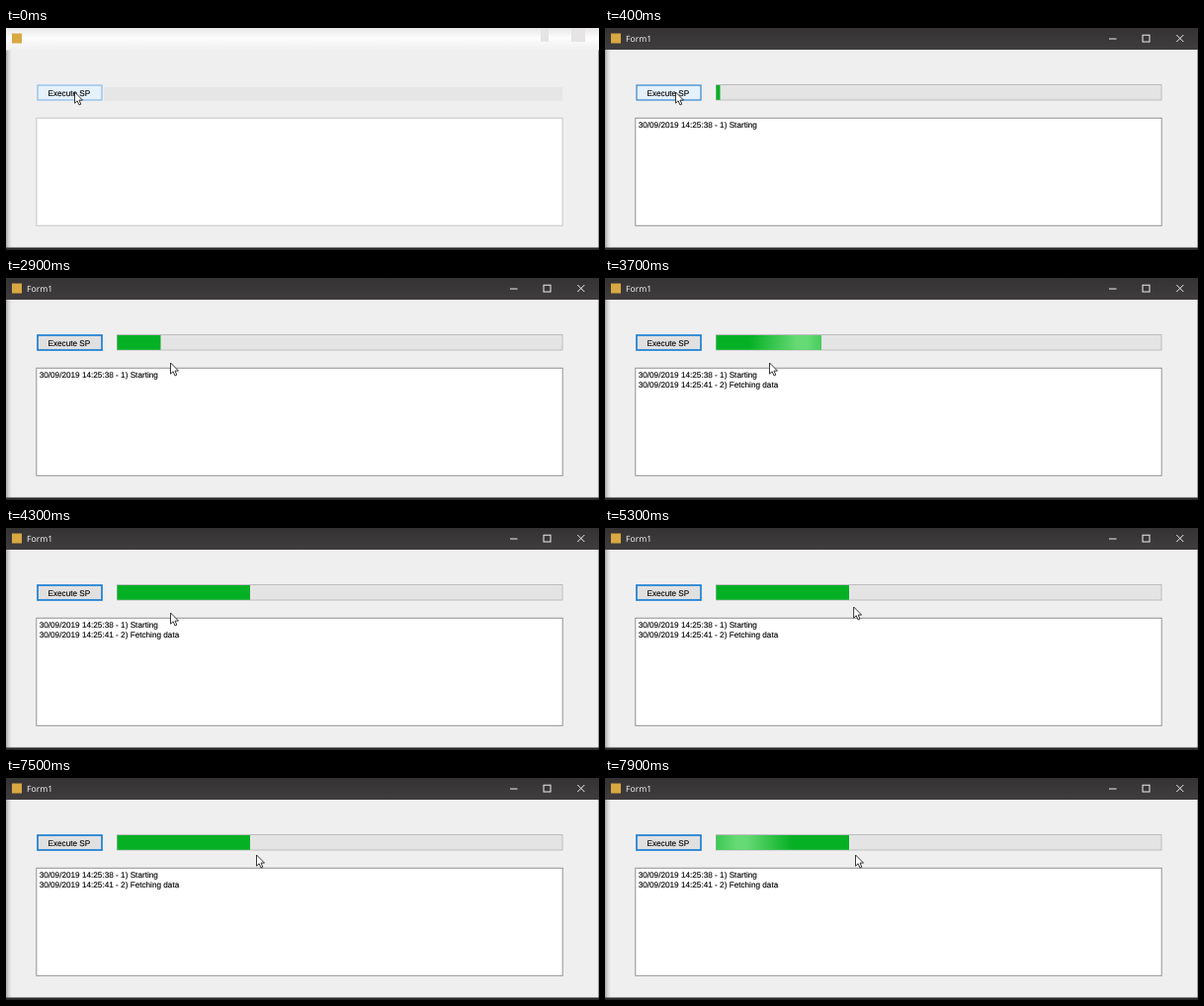
Animation of 600x225 px, one loop 8000 ms. Source, as an HTML page:

```html
<!DOCTYPE html>
<html lang="en">
<head>
<meta charset="utf-8">
<title>Form1</title>
<style>
  html, body { margin: 0; width: 100%; height: 100%; overflow: hidden; background: #f0eff0; }
  svg { display: block; width: 600px; height: 225px; }
  text {
    font: 8.2px "Liberation Sans", Arial, sans-serif;
    fill: #000; stroke: #000; stroke-width: .12px;
    text-rendering: geometricPrecision;
  }
  .title { font: 8.6px "Open Sans", sans-serif; fill: #fff; stroke: none; }
</style>
</head>
<body>
<svg viewBox="0 0 600 225">
  <defs>
    <linearGradient id="edge">
      <stop offset="0" stop-color="#aaa8a9"/>
      <stop offset=".5" stop-color="#dad9da"/>
      <stop offset="1" stop-color="#f0eff0"/>
    </linearGradient>
    <linearGradient id="bar" x2="0" y2="1">
      <stop offset="0" stop-color="#353233"/>
      <stop offset="1" stop-color="#403d3e"/>
    </linearGradient>
    <linearGradient id="paleBar" x2="0" y2="1">
      <stop offset="0" stop-color="#e9e7e8"/>
      <stop offset=".45" stop-color="#fdfdfd"/>
      <stop offset="1" stop-color="#f0eff0"/>
    </linearGradient>
    <linearGradient id="shine" gradientUnits="userSpaceOnUse" x1="-52" x2="52" y1="0" y2="0">
      <stop offset="0" stop-color="#7be387" stop-opacity="0"/>
      <stop offset=".46" stop-color="#7be387" stop-opacity=".82"/>
      <stop offset=".56" stop-color="#7be387" stop-opacity=".82"/>
      <stop offset="1" stop-color="#7be387" stop-opacity="0"/>
    </linearGradient>
  </defs>

  <rect width="600" height="225" fill="#f0eff0"/>
  <rect y="22" width="6" height="201" fill="url(#edge)"/>
  <rect x="599" y="22" width="1" height="201" fill="#a3a1a2"/>
  <rect width="600" height="22" fill="url(#bar)"/>
  <text class="title" x="21" y="14">Form1</text>
  <g fill="none" stroke="#f0f0f0">
    <path d="M510 11h7.5"/>
    <rect x="544" y="7.2" width="7" height="6.8"/>
    <path d="M578.3 7l7 7m0-7l-7 7"/>
  </g>

  <rect x="112.5" y="57.5" width="450.5" height="15.5" fill="#e5e4e5" stroke="#bdbcbd"/>
  <rect id="fill" x="112.5" y="58" height="14.8" fill="#06b025"/>
  <rect id="glow" x="112.5" y="58" height="14.8" fill="url(#shine)"/>

  <rect id="button" x="32" y="58" width="65" height="15"/>
  <rect x="30.8" y="91.3" width="532.4" height="109" fill="#fff" stroke="#939293"/>

  <g id="pale">
    <rect width="600" height="22.5" fill="url(#paleBar)"/>
    <path d="M541 0h8v14h-8zM572 0h14v14h-14z" fill="#e6e4e5"/>
    <rect x="99" y="54" width="468" height="22" fill="#f0eff0"/>
    <rect x="99" y="60" width="464" height="14" fill="#e7e6e7"/>
    <g fill="none" stroke="#fff" stroke-opacity=".5" stroke-width="1.6">
      <rect x="32" y="58" width="65" height="15"/>
      <rect x="30.8" y="91.3" width="532.4" height="109"/>
    </g>
  </g>

  <rect x="6" y="5.5" width="10" height="10" fill="#d8a842"/>
  <text x="42.5" y="69">Execute SP</text>
  <text id="line1" x="33.7" y="100.8">30/09/2019 14:25:38 - 1) Starting</text>
  <text id="line2" x="33.7" y="110.6">30/09/2019 14:25:41 - 2) Fetching data</text>

  <rect y="222.5" width="600" height="2.5" fill="#2b292a"/>
  <path id="cursor" d="M-.5 0V11.2L2.1 8.8 4 13 5.8 12.2 4 8.1H7.5Z"
        fill="#fff" stroke="#222" stroke-width=".9" stroke-linejoin="round"/>
</svg>
<script>
  const LOOP = 8000, STEP = 100;
  const $ = id => document.getElementById(id);
  const [fill, glow, shine, pale, button, line1, line2, cursor] =
    ['fill', 'glow', 'shine', 'pale', 'button', 'line1', 'line2', 'cursor'].map($);

  // seconds, x, y
  const path = [
    [0, 70, 65], [.4, 72, 65], [1.1, 73, 66], [1.7, 97, 80], [2.4, 158, 87],
    [2.9, 167, 86], [4.6, 167, 86], [5.2, 252, 80], [6.1, 253, 80], [6.5, 254, 78], [8, 254, 78]
  ];
  const sweeps = [1.37, 3.13, 5.39, 7.565];

  const set = (el, attrs) => {
    for (const key in attrs) el.setAttribute(key, attrs[key]);
  };
  const show = (el, on) => set(el, { visibility: on ? 'visible' : 'hidden' });

  function pointAt(t) {
    const i = path.findIndex(p => p[0] > t);
    const [t0, x0, y0] = path[i - 1], [t1, x1, y1] = path[i];
    const k = (t - t0) / (t1 - t0);
    return [x0 + (x1 - x0) * k, y0 + (y1 - y0) * k];
  }

  function barWidth(t) {
    return t < 3.1
      ? Math.max(0, Math.min(44, (t - .36) * 100))
      : Math.min(134.5, 44.5 + (t - 3.08) * 100);
  }

  function draw(t) {
    const width = barWidth(t);
    const start = sweeps.filter(s => s <= t).pop();
    const center = start === undefined ? -100 : 50 + 260 * (t - start);
    set(fill, { width });
    set(glow, { width });
    set(shine, { gradientTransform: `translate(${center})` });
    set(pale, { opacity: Math.max(0, 1 - t / .3) });

    const [x, y] = pointAt(t);
    set(cursor, { transform: `translate(${x} ${y})` });
    const hover = y < 74;
    set(button, hover
      ? { fill: '#e5f1fb', stroke: '#2f86cf', 'stroke-width': 1.2 }
      : { fill: '#e1e0e1', stroke: '#1a7fd4', 'stroke-width': 1.7 });

    show(line1, t >= .3);
    show(line2, t >= 3.1);
  }

  function tick() {
    const ms = performance.now() % LOOP;
    draw(Math.floor(ms / STEP) * STEP / 1000);
    requestAnimationFrame(tick);
  }
  tick();
</script>
</body>
</html>
```
